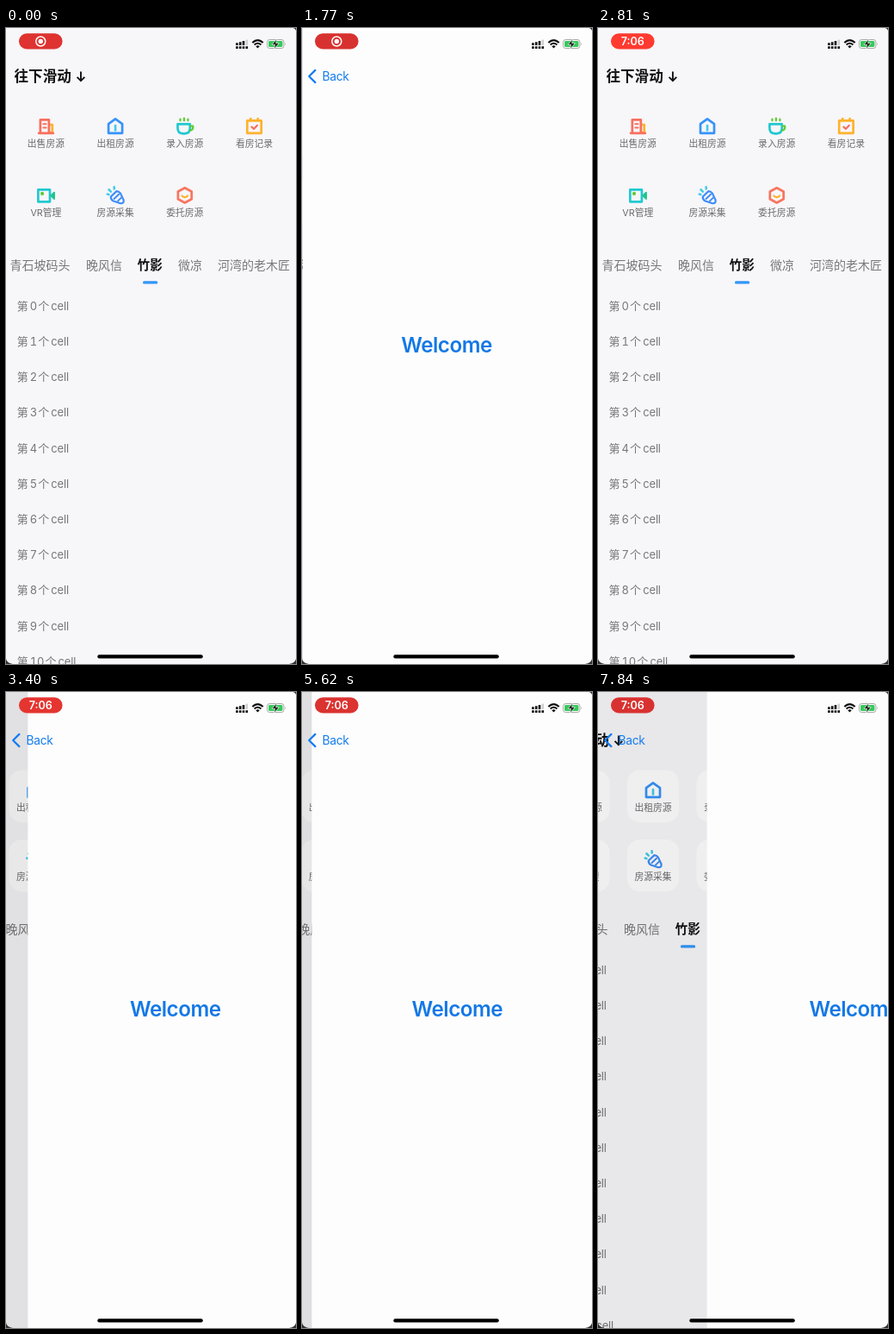
Animation, 337 px wide and 737 px high, one loop 7990 ms. Source, as an HTML page:

```html
<!DOCTYPE html>
<html lang="zh">
<head>
<meta charset="utf-8">
<title>Push and pop</title>
<style>
  html, body { margin: 0; width: 100%; height: 100%; overflow: hidden; background: #fdfdfd; }
  svg { display: block; width: 337px; height: 737px; }
  text { font-family: Inter, "Noto Sans CJK SC", "Noto Sans CJK", sans-serif; }
  .label { font-size: 10.8px; fill: #6c6c70; text-anchor: middle; }
  .tab { font-size: 14px; fill: #77777a; }
  .tab.on { font-size: 14.7px; font-weight: 700; fill: #111; }
  .row { font-size: 13px; fill: #77777a; font-variant-numeric: tabular-nums; }
  .icon { fill: none; stroke-width: 2.7; stroke-linejoin: round; stroke-linecap: round; }
  .latin { letter-spacing: -.2px; }
</style>
</head>
<body>
<svg viewBox="0 0 337 737" xmlns="http://www.w3.org/2000/svg">
  <rect width="337" height="737" fill="#f7f6f9"/>
  <g id="home">
    <g id="cards" fill="#fff"></g>
    <text x="9.5" y="61.8" font-size="16.6" font-weight="700" fill="#111">往下滑动</text>
    <path d="M87 50.5V61M82.6 56.8L87 61.2L91.4 56.8" fill="none" stroke="#111" stroke-width="1.9"/>
    <g id="menu"></g>
    <g id="tabs"></g>
    <rect x="159" y="293.3" width="17.3" height="3.3" rx="1.6" fill="#3296fa"/>
    <g id="rows"></g>
  </g>
  <rect id="dim" width="337" height="737"/>
  <g id="page">
    <rect width="338" height="737" fill="#fdfdfd"/>
    <text id="welcome" x="167" y="376.3" font-size="24.2" font-weight="600" letter-spacing="-.5" text-anchor="middle" fill="#1478e6">Welcome</text>
  </g>
  <g id="back">
    <path d="M15.4 48.9L8.2 56L15.4 63.1" fill="none" stroke="#147cf0" stroke-width="2.2" stroke-linecap="round" stroke-linejoin="round"/>
    <text x="23.5" y="60.9" font-size="13.8" letter-spacing="-.3" fill="#147cf0">Back</text>
  </g>

  <rect id="pill" x="15" y="6.3" width="50.6" height="18.2" rx="9.1"/>
  <g id="record">
    <circle cx="40.3" cy="15.5" r="5.5" fill="none" stroke="#fff" stroke-width="1.5"/>
    <circle cx="40.3" cy="15.5" r="2.7" fill="#fff"/>
  </g>
  <text id="clock" x="40.3" y="20" font-size="12.6" font-weight="600" text-anchor="middle" fill="#fff">7:06</text>

  <g>
    <path d="M268.4 20V17.3M272.2 20V16.2M276 20V15" stroke="#111" stroke-width="2.6"/>
    <path d="M279.8 20V13.6" stroke="#d0d0d3" stroke-width="2.6"/>
    <path d="M267.1 22.6H281.1" stroke="#111" stroke-width="2.6" stroke-dasharray="2.6 1.2"/>
    <g fill="none" stroke="#111" stroke-width="2.1">
      <path d="M286.3 17.1Q292.5 11.3 298.7 17.1"/>
      <path d="M288.6 19.5Q292.5 16 296.4 19.5"/>
    </g>
    <path d="M290.3 21.2Q292.5 19.5 294.7 21.2L292.5 23.5Z" fill="#111"/>
    <rect x="303.5" y="13.5" width="19.4" height="10" rx="2.8" fill="#fdfdfd" stroke="#a7a7aa"/>
    <rect x="305" y="15" width="16.4" height="7" rx="1.4" fill="#36c95b"/>
    <path d="M324.2 16.7Q325.6 18.5 324.2 20.3Z" fill="#a7a7aa"/>
    <path d="M314.8 12.6L309 19.3H312.6L311.4 24.6L317.3 17.6H313.6Z" fill="#111" stroke="#fdfdfd" stroke-width=".7"/>
  </g>
  <rect x="106.3" y="726.2" width="122.5" height="4.3" rx="2.1" fill="#000"/>
  <path d="M0 731Q1 736 8 737H0ZM337 731Q336 736 329 737H337ZM333.5 0Q336.4 .6 337 3V0Z" fill="#333"/>
</svg>

<script>
const $ = id => document.getElementById(id);

// Icons are drawn around their own centre.
const icons = {
  building: `<path d="M5 -1.6H7.4V7.4H5" stroke="#ffb22c"/>
    <path d="M-6.5 8V-7.2H3.5V8M-8.3 8.2H8.5" stroke="#f8705e"/>
    <path d="M-3 -2.4H.2M-3 2H.2" stroke="#f8705e" stroke-width="2"/>`,
  house: `<path d="M-8 -2.5L0 -8.3L8 -2.5V8.2H-8Z" stroke="#3693fa"/>
    <path d="M0 -.5V4.8" stroke="#43cbea"/>`,
  cup: `<path d="M-8.3 -2.3H6V2.5Q6 8.7 0 8.7H-2.3Q-8.3 8.7 -8.3 2.5Z" stroke="#20c9d0"/>
    <path d="M6.6 0H9.5V1.5Q9.5 4.8 6.4 5M-5.3 -8V-6.3M-.8 -9V-6.3M3.7 -8V-6.3" stroke="#5fcb32" stroke-width="2.2"/>`,
  calendar: `<path d="M-8.2 -6.2H8.2V8.2H-8.2ZM-4.2 -8.6V-6M4.2 -8.6V-6" stroke="#ffb22c"/>
    <path d="M-3 1L-.5 3.3L3.3 -.7" stroke="#f8705e" stroke-width="2.2"/>`,
  camera: `<path d="M-9 -6.6H4.6V7.4H-9Z" stroke="#20c9d0"/>
    <path d="M6 .3L9.6 -3.2V4Z" stroke="#20c58e" fill="#20c58e" stroke-width="2"/>
    <circle cx="-4.3" cy="-2" r="2.1" fill="#5fcb32"/>`,
  torch: `<path d="M-5.3 1.6L1.4 -4.8Q4 -4.7 5.8 -2.5L9.6 5.6Q10 9.7 6 9.3L-2.3 6.6Q-5.4 5 -5.3 1.6Z" stroke="#3e8df7" stroke-width="2.2"/>
    <path d="M-1.5 4L4 -1.2M3 6.5L6.6 3" stroke="#3e8df7" stroke-width="2"/>
    <path d="M-9.3 -1.4L-7.6 -1M-7.6 -6.6L-5.2 -4.3M-1.4 -9.6L-1.3 -7.5" stroke="#43cbea" stroke-width="2.6"/>`,
  face: `<path d="M0 -8.6L7.9 -4.4V4.4L0 8.6L-7.9 4.4V-4.4Z" stroke="#f8755e"/>
    <path d="M-3.3 .5Q0 4 3.3 .5" stroke="#ffb22c" stroke-width="2.2"/>`
};
const menu = [
  ['building', '出售房源'], ['house', '出租房源'], ['cup', '录入房源'], ['calendar', '看房记录'],
  ['camera', 'VR管理'], ['torch', '房源采集'], ['face', '委托房源']
];
const tabs = [[4.5, '青石坡码头'], [93, '晚风信'], [152.6, '竹影', 'on'], [200, '微凉'], [246, '河湾的老木匠']];

const cell = i => ({ x: 46.4 + 80.7 * (i % 4), y: 113.6 + 80.3 * Math.floor(i / 4) });

$('cards').innerHTML = menu.map((_, i) => {
  const { x, y } = cell(i);
  return `<rect x="${x - 30.3}" y="${y - 23}" width="60.6" height="60.6" rx="15"/>`;
}).join('');
$('menu').innerHTML = menu.map(([icon, label], i) => {
  const { x, y } = cell(i);
  return `<g class="icon" transform="translate(${x} ${y})">${icons[icon]}</g>
    <text class="label" x="${x}" y="${y + 24.2}">${label}</text>`;
}).join('');
$('tabs').innerHTML = tabs.map(([x, name, on = '']) =>
  `<text class="tab ${on}" x="${x}" y="280.2">${name}</text>`).join('');
$('rows').innerHTML = Array.from({ length: 11 }, (_, i) =>
  `<text class="row" x="12.7" y="${326.7 + 41.22 * i}">第<tspan class="latin" dx="2">${i}</tspan><tspan dx="1.2">个</tspan><tspan class="latin" dx="2.2">cell</tspan></text>`
).join('');

const WIDTH = 337, LOOP = 7990, STEPS = 54, STEP = LOOP / STEPS;
const CLOCK_FROM = 2200, PULSE = 2023, PULSE_DARK = 1770;
// [start in ms, page shown afterwards: 1 = welcome, 0 = home]
const moves = [[1190, 1], [2130, 0], [3100, 1], [3780, 0], [5250, 1], [6480, 0], [7691, 1]];

// Critically damped spring: the share of the way still to go.
const remaining = ms => (1 + .014 * ms) * Math.exp(-.014 * ms);

function progress(t) {
  const move = moves.filter(([start]) => start <= t).pop();
  if (!move) return 0;
  const rest = remaining(t - move[0]);
  return move[1] ? 1 - rest : rest;
}

const shift = (id, x) => $(id).setAttribute('transform', `translate(${x.toFixed(2)} 0)`);
const fade = (id, opacity) => $(id).setAttribute('opacity', Math.min(1, opacity).toFixed(3));

function draw(t) {
  const p = progress(t), x = WIDTH * (1 - p);
  shift('home', -.3 * WIDTH * p);
  shift('page', x);
  shift('welcome', 4.5 * Math.min(1, x / 26));
  fade('dim', .1 * p);
  fade('cards', p * 2.5);
  fade('back', p * 2);

  const glow = .5 - .5 * Math.cos(2 * Math.PI * (t - PULSE_DARK) / PULSE);
  $('pill').setAttribute('fill', `rgb(${216 + 39 * glow}, ${50 + 8 * glow}, 48)`);
  fade('record', t < CLOCK_FROM ? 1 : 0);
  fade('clock', t < CLOCK_FROM ? 0 : 1);
}

const begin = performance.now();
function tick() {
  const t = (performance.now() - begin) % LOOP;
  draw(Math.min(STEPS - 1, Math.floor((t + 10) / STEP)) * STEP);
  requestAnimationFrame(tick);
}
tick();
</script>
</body>
</html>
```
